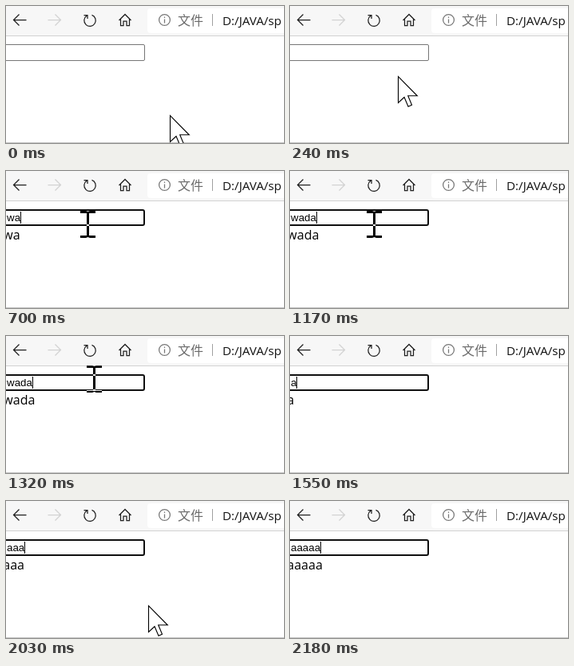
Animation of 348x172 px, one loop 2650 ms. Source, as an HTML page:

```html
<!DOCTYPE html>
<html lang="zh">
<head>
<meta charset="utf-8">
<style>
  html, body { margin: 0; width: 100%; height: 100%; overflow: hidden; background: #fff; }
  svg { display: block; width: 348px; height: 172px; background: #fff; }
  text { white-space: pre; }
  .ui { font: 15.2px "Open Sans", sans-serif; }
  .cjk { font: 16px "Noto Sans CJK SC", "Noto Sans CJK", sans-serif; }
  .icon { fill: none; stroke: #1f1f1f; stroke-width: 1.25; }
  #typed { font: 13.333px "Liberation Sans", Arial, sans-serif; }
  #echo { font: 16px "Open Sans", sans-serif; }
  #beam { mix-blend-mode: difference; fill: #fff; }
</style>
</head>
<body>
<svg viewBox="0 0 348 172">
  <rect width="348" height="172" fill="#fff"/>
  <rect width="348" height="38" fill="#f7f7f7"/>
  <rect y="37" width="348" height="1" fill="#d2d2d2"/>
  <rect x="177" y="3" width="190" height="31" rx="4" fill="#fff"/>

  <g class="icon">
    <path d="M25.5 17.5H9.5M16.5 10.5l-7 7 7 7"/>
    <path d="M52.5 17.5h16M61.5 10.5l7 7-7 7" stroke="#d2d2d2"/>
    <path d="M107.5 11.4a7.2 7.2 0 1 1-6.5.8M97.5 11.5h4.5v4.5"/>
    <path d="M141.5 18l7.5-7.5 7.5 7.5M143.5 16.5v8h3.5v-5.500h4v5.500h3.500v-8"/>
    <g stroke="#767676">
      <circle cx="198.500" cy="17.500" r="6.900"/>
      <path d="M198.500 16.500v5M198.500 13.500v1.500"/>
    </g>
  </g>
  <text class="cjk" x="215" y="23.500" fill="#6b6b6b">文件</text>
  <rect x="258" y="10" width="1" height="15" fill="#a0a0a0"/>
  <text class="ui" x="271" y="23.500" fill="#111">D:/JAVA/sp</text>

  <rect id="field" x="-20" fill="#fff"/>
  <text id="typed" x="1" y="63"></text>
  <rect id="caret" y="51" width="1" height="15"/>
  <text id="echo" x="-3.700" y="86"></text>
  <rect y="171" width="348" height="1" fill="#c8c8c8"/>

  <path id="arrow" fill="#fff" stroke="#000" stroke-width="1.100"
    d="M.5 .5V33.500L8 26.500 13 38.300 17.500 36.300 12.700 24.800H24.300Z"/>
  <path id="beam" d="M-9.500-17h7l2.500 1 2.500-1h7v3h-8v28h8v3h-7l-2.500-1-2.500 1h-7v-3h8v-28h-8z"/>
</svg>
<script>
const LOOP = 2650;
const $ = id => document.getElementById(id);
const [field, typed, caret, echo, arrow, beam] =
  ["field", "typed", "caret", "echo", "arrow", "beam"].map($);

// [start ms, text]; the first entry gives the field focus
const typing = [
  [560, ""], [630, "w"], [700, "wa"], [850, "wad"], [960, "wada"],
  [1330, "wad"], [1400, "w"], [1480, ""], [1550, "a"], [1720, "aa"],
  [2030, "aaa"], [2100, "aaaa"], [2180, "aaaaa"]
];

// [start ms, x, y]; no position means the pointer is hidden
const moves = [
  [0, 205, 137], [70, 186, 123], [150, 161, 106], [230, 135, 88],
  [310, 113, 74], [390, 100.5, 60], [560, 102.5, 67], [1170, 105.5, 67],
  [1250, 110.5, 54], [1330], [1640, 68, 90], [1800, 74, 93],
  [1870, 68, 90], [1950, 120, 110], [2030, 178, 131], [2100]
];

const current = (steps, t) => steps.findLast(s => s[0] <= t);
const show = (el, on) => el.setAttribute("visibility", on ? "visible" : "hidden");
const set = (el, attrs) => {
  for (const k in attrs) el.setAttribute(k, attrs[k]);
};

function draw(t) {
  const step = current(typing, t);
  const text = step ? step[1] : "";
  const [, x, y] = current(moves, t);
  const visible = x !== undefined;
  const over = visible && y >= 48 && y < 70;

  const line = step ? 2 : 1;
  set(field, {
    y: 48 + line / 2, width: 194 - line / 2, height: 21 - line,
    rx: step ? 2 : 1.5, "stroke-width": line,
    stroke: step ? "#101010" : over ? "#4c4c4c" : "#767676"
  });
  typed.textContent = echo.textContent = text;
  const width = [...text].reduce((w, c) => w + (c === "w" ? 9.63 : 7.41), 0);
  caret.setAttribute("x", Math.round(1 + width));
  show(caret, step);

  show(arrow, visible && !over);
  show(beam, over);
  if (visible) (over ? beam : arrow).setAttribute("transform", `translate(${x} ${y})`);
}

const start = performance.now();
function tick() {
  draw((performance.now() - start) % LOOP);
  requestAnimationFrame(tick);
}
tick();
</script>
</body>
</html>
```
